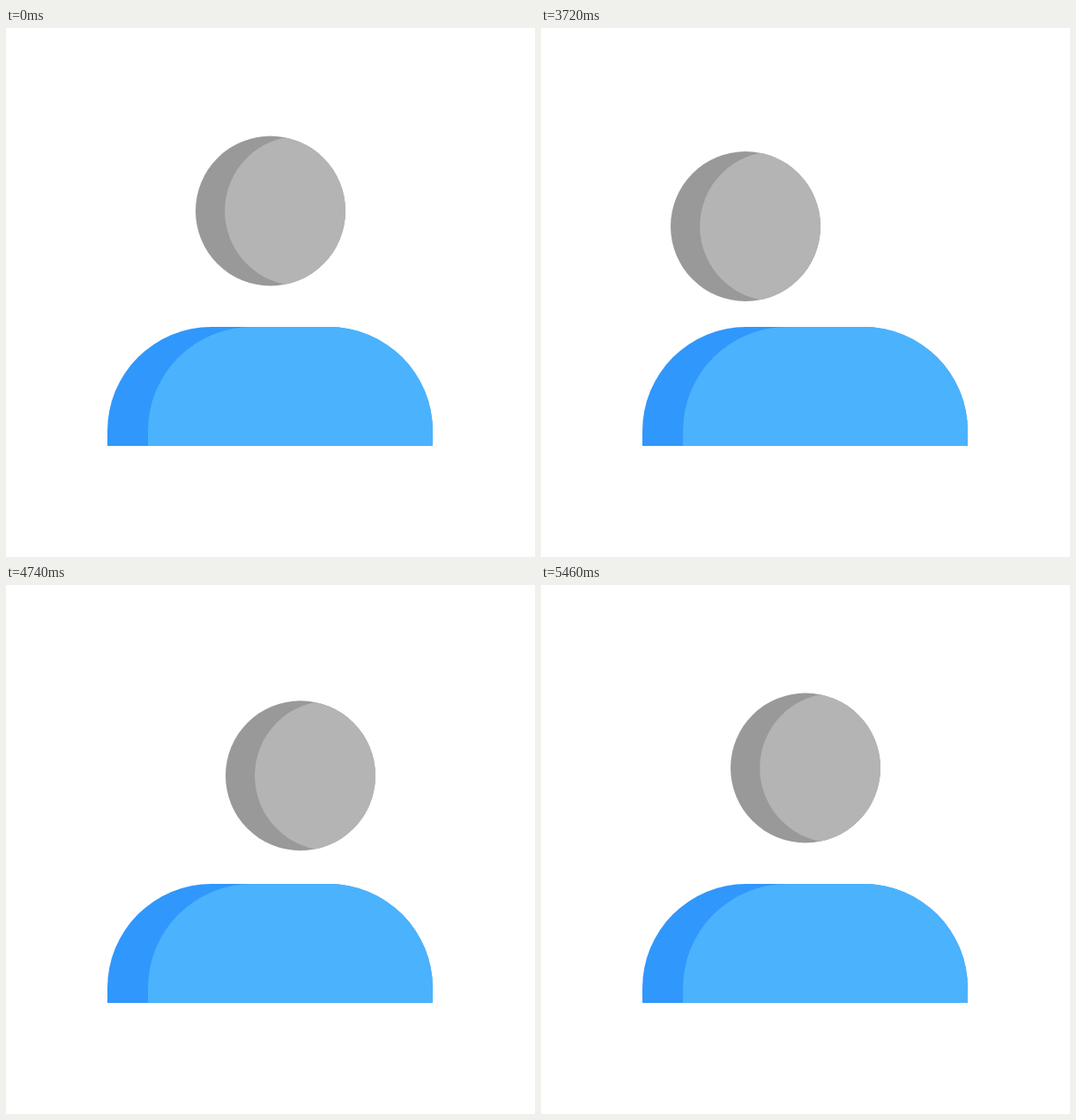
An HTML page for the animation above (5550 ms loop, 600x600 px).

```html
<!DOCTYPE html>
<html lang="en">
<head>
<meta charset="utf-8">
<title>User icon</title>
<style>
  html, body { margin: 0; width: 100%; height: 100%; overflow: hidden; background: #fff; }
  svg { display: block; width: 100%; height: 100%; }
</style>
</head>
<body>
<svg viewBox="0 0 600 600">
  <clipPath id="disc"><circle r="1"/></clipPath>
  <path id="shade" fill="#3097fc"/>
  <path id="torso" fill="#4bb2fd"/>
  <g id="head">
    <circle r="1" fill="#999"/>
    <g clip-path="url(#disc)"><path id="face" fill="#b4b4b4"/></g>
  </g>
</svg>
<script>
const LOOP = 5550, STEP = 30, RADIUS = 85;
const POPS = [3000, 4890];
const POP_TIME = 570, PEAK = 120;

const set = (id, name, value) => document.getElementById(id).setAttribute(name, value);
const part = (t, from, to) => Math.min(1, Math.max(0, (t - from) / (to - from)));

// Smooth step from 0 to 1, and a smooth swell from 0 to 1 and back
function ease(t, from, to) {
  const s = part(t, from, to);
  return s * s * (3 - 2 * s);
}
const bump = (t, from, to) => Math.sin(Math.PI * part(t, from, to)) ** 2;

// One jump: the body swells, the head is thrown up, hangs and falls
function pop(t) {
  if (t <= 0 || t >= POP_TIME) return { rise: 0, lift: 0, stretch: 0 };
  const tau = t / PEAK;
  const pulse = (tau * Math.exp(1 - tau)) ** 2.9;
  const fall = part(t, PEAK, POP_TIME);
  const lift = t < PEAK ? 1 - (1 - tau) ** 1.62 : 1 - fall ** 2.73;
  return {
    rise: 51 * pulse,
    lift: 70.5 * lift,
    stretch: 6.9 * Math.sin(Math.PI * fall) - 11.5 * pulse
  };
}

function torsoPath(left, up) {
  const top = 339 - up, base = 474 - 0.216 * up, r = 118;
  return `M${left} ${base}V${top + r}a${r} ${r} 0 0 1 ${r} ${-r}` +
    `H${484 - r}a${r} ${r} 0 0 1 ${r} ${r}V${base}Z`;
}

function draw(t) {
  const { rise, lift, stretch } = pop(t - POPS[t < POPS[1] ? 0 : 1]);
  set('shade', 'd', torsoPath(115, rise));
  set('torso', 'd', torsoPath(161, rise));

  const toLeft = ease(t, 3390, 3570);
  const toRight = ease(t, 3990, 4230);
  const toMiddle = ease(t, 4620, 4860);
  const tilt = bump(t, 3210, 3570);
  const windUp = bump(t, 3900, 4110);
  const hop = bump(t, 3990, 4230);
  const land = bump(t, 4110, 4350);

  const x = 300 - 68 * toLeft + 136 * toRight - 68 * toMiddle
    - 18 * bump(t, 3390, 3720) - 24 * windUp + 7 * land + 12 * bump(t, 4530, 4740);
  const y = 207.5 + 17.5 * (toLeft - toMiddle) + 12 * windUp - 18 * hop - lift;
  const rx = RADIUS + 3 * tilt + 6 * hop - 5 * land;
  const ry = RADIUS + stretch - land;
  const leanX = 0.054 * land - 0.08 * hop;
  const leanY = -0.1 * tilt - 0.02 * bump(t, 4920, 5100);
  set('head', 'transform', `matrix(${rx} ${leanY * rx} ${leanX * ry} ${ry} ${x} ${y})`);

  // Lit side in head units: a half ellipse, open to the right
  const cx = 0.39 - 0.23 * tilt - 0.03 * land;
  const w = cx + 0.61 - 0.02 * tilt + 0.03 * land;
  const h = 1 - 0.06 * land;
  set('face', 'd', `M2 ${-h}H${cx}A${w} ${h} 0 0 0 ${cx} ${h}H2Z`);
  set('face', 'transform', `matrix(1 ${0.1 * tilt} 0 1 0 ${-0.1 * tilt * cx})`);
}

const start = performance.now();
function frame() {
  const t = (performance.now() - start) % LOOP;
  draw(Math.floor(t / STEP) * STEP);
  requestAnimationFrame(frame);
}
frame();
</script>
</body>
</html>
```
